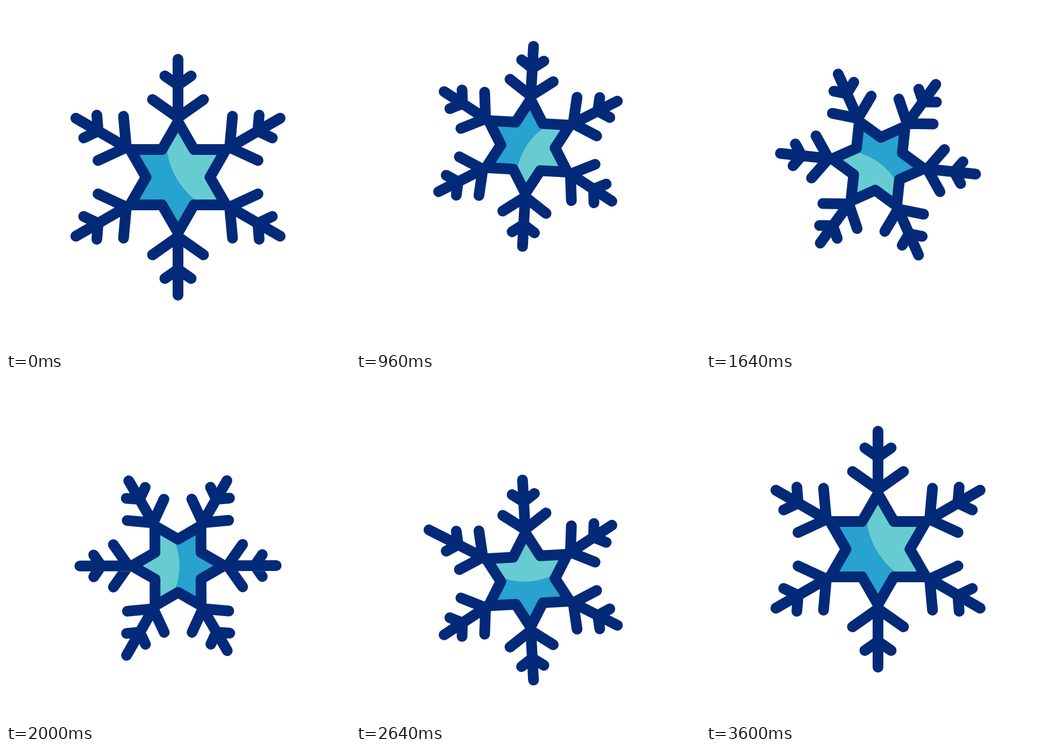
An HTML page with a canvas for the animation above (3620 ms loop, 640x640 px).

```html
<!DOCTYPE html>
<html lang="en">
<head>
<meta charset="utf-8">
<title>Snowflake</title>
<style>
  html, body { margin: 0; width: 100%; height: 100%; overflow: hidden; background: #fff; }
  canvas { display: block; }
</style>
</head>
<body>
<canvas id="stage" width="640" height="640"></canvas>
<script>
const ctx = document.getElementById('stage').getContext('2d');
const NAVY = '#032a78', BLUE = '#28a2cf', LIGHT = '#67ccd1';
const LOOP = 3620, TURN = 3600, THIRD = TURN / 3, STEP = 20;
const STAR = 103, ARM = 219.5, MIN_SCALE = 0.832, BOB = 64;

// Smooth 0..1 progress between two times
const ease = (t, from, to) => {
  const x = Math.min(1, Math.max(0, (t - from) / (to - from)));
  return x * x * (3 - 2 * x);
};

function starPath(scale) {
  ctx.beginPath();
  for (let i = 0; i < 12; i++) {
    const r = scale * (i % 2 ? STAR / Math.sqrt(3) : STAR);
    const a = i * Math.PI / 6;
    ctx.lineTo(r * Math.sin(a), -r * Math.cos(a));
  }
  ctx.closePath();
}

// V-shaped pair of twigs; all distances are measured outwards from the centre
function twigs(scale, width, end, joint) {
  ctx.moveTo(-width * scale, -end * scale);
  ctx.lineTo(0, -joint * scale);
  ctx.lineTo(width * scale, -end * scale);
}

function draw(t) {
  const shrink = ease(t, 0, THIRD) - ease(t, 2 * THIRD, TURN);
  const scale = 1 - (1 - MIN_SCALE) * shrink;
  // The first arm's tip grows back earlier than the others
  const firstShrink = ease(t, 0, THIRD) - ease(t, THIRD, TURN);
  const firstScale = 1 - (1 - MIN_SCALE) * firstShrink;
  const bob = 2 * ease(t, THIRD, 2 * THIRD) - ease(t, 0, THIRD) - ease(t, 2 * THIRD, TURN);

  ctx.setTransform(1, 0, 0, 1, 0, 0);
  ctx.fillStyle = '#fff';
  ctx.fillRect(0, 0, 640, 640);
  ctx.translate(320, 318.5 + BOB * bob);
  ctx.rotate(2 * Math.PI * ease(t, 0, TURN));

  ctx.save();
  starPath(scale);
  ctx.fillStyle = BLUE;
  ctx.fill();
  ctx.clip();
  ctx.beginPath();
  ctx.arc(122.5 * scale, -70.75 * scale, 144.8 * scale, 0, 2 * Math.PI);
  ctx.fillStyle = LIGHT;
  ctx.fill();
  ctx.restore();

  ctx.strokeStyle = NAVY;
  ctx.lineWidth = 20;
  ctx.lineCap = ctx.lineJoin = 'round';
  starPath(scale);
  ctx.stroke();
  for (let i = 0; i < 6; i++) {
    ctx.beginPath();
    ctx.moveTo(0, -STAR * scale);
    ctx.lineTo(0, -ARM * (i ? scale : firstScale));
    twigs(scale, 24.5, 188.5, 171.5);
    twigs(scale, 47.5, 144.5, 111);
    ctx.stroke();
    ctx.rotate(Math.PI / 3);
  }
}

function tick() {
  // 50 steps per second, with a little tolerance for clock rounding
  draw(Math.floor((performance.now() % LOOP + 1) / STEP) * STEP);
  requestAnimationFrame(tick);
}
tick();
</script>
</body>
</html>
```
